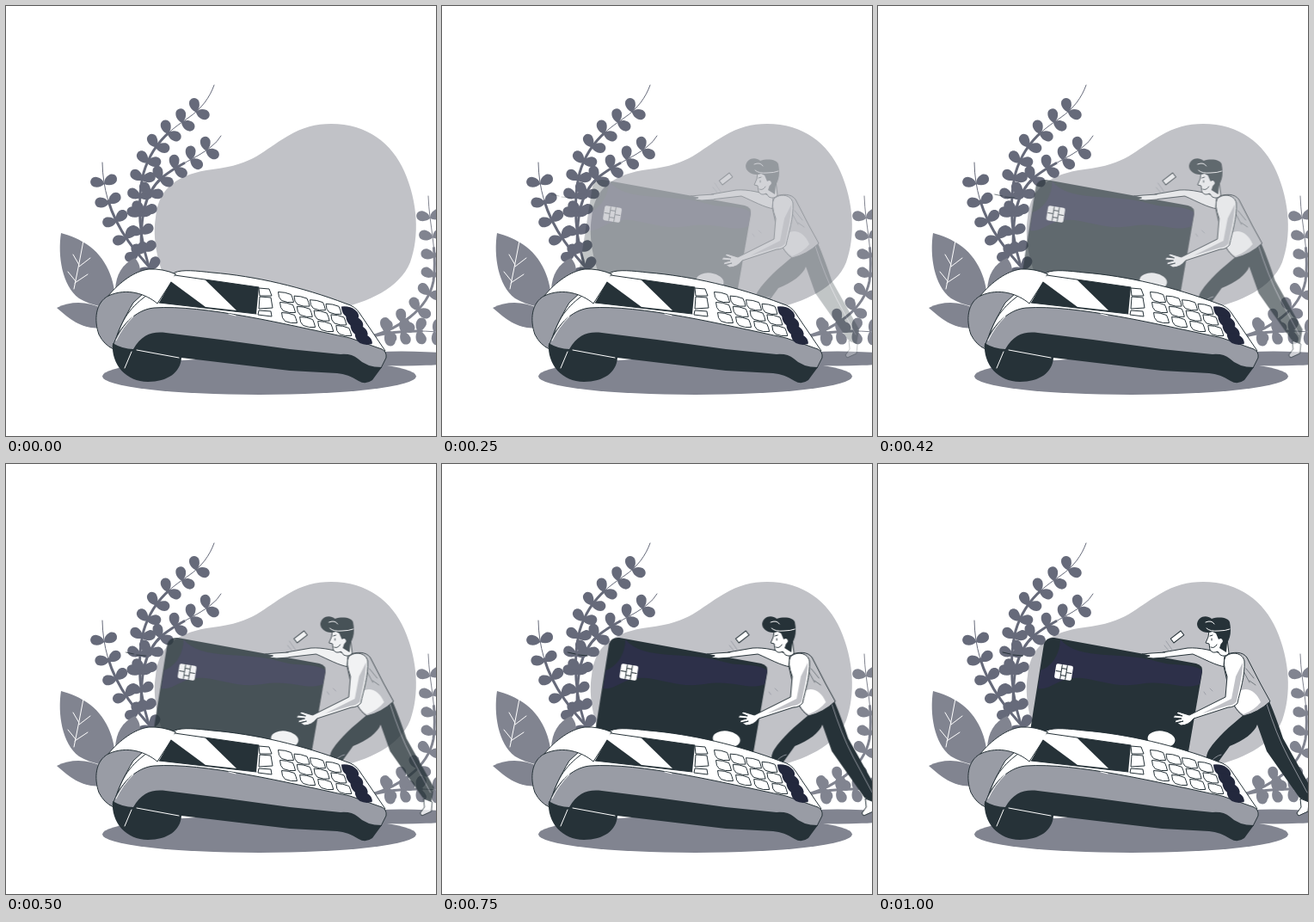
Recreate the animation shown at these times as an HTML page. Size 500 px wide and 500 px high, loop 1040 ms.

```html
<!DOCTYPE html>
<html lang="en">
<head>
<meta charset="utf-8">
<title>Card payment</title>
<style>
html, body { margin: 0; width: 100%; height: 100%; overflow: hidden; background: #fff; }
svg { display: block; width: 100vw; height: 100vh; }
.dark { fill: #263238; }
.navy { fill: #2d3049; }
.grey { fill: #999ca5; }
.mid { fill: #818490; }
.pale { fill: #c1c2c7; }
.white { fill: #fff; }
.ink { stroke: #263238; stroke-width: 1; stroke-linejoin: round; }
.line { fill: none; stroke: #263238; stroke-width: 1; stroke-linecap: round; }
.light { fill: none; stroke: #fff; stroke-width: 1; stroke-linecap: round; }
.soft { fill: none; stroke: #999ca5; stroke-width: .9; stroke-linecap: round; }
</style>
</head>
<body>
<svg viewBox="0 0 500 500">
  <path class="pale" d="M378 137C420 137 449 160 463 192C479 228 481 268 470 298C458 328 420 345 385 352L190 330C176 300 170 270 174 246C177 210 202 195 240 190C290 184 298 168 328 151C345 141 360 137 378 137Z"/>
  <ellipse class="mid" cx="294.500" cy="430.500" rx="182.500" ry="21.500"/>
  <ellipse class="mid" cx="460" cy="410" rx="74" ry="8.500"/>

  <g id="plants"></g>

  <path class="mid" d="M64 264C60 290 65 325 85 340C100 349 116 350 126 352C130 325 118 295 98 280C86 271 75 267 64 264Z"/>
  <path class="mid" d="M59 351C75 343 95 343 112 352V374C90 377 75 365 59 351Z"/>
  <path class="mid" d="M150 293C135 300 128 312 127 330L153 318C158 308 156 300 150 293Z"/>
  <path class="light" d="M90 273Q85 300 79 329M78 289L85 301M98 293L85 303M72 309L81 320M95 312L80 322"/>

  <g id="mover">
    <path class="line" d="M145 219L154 221M157 222L168 223"/>

    <!-- far arm -->
    <path class="white ink" d="M404 222C390 217 374 213 360 214L331 219V225L366 221C380 227 392 234 404 236Z"/>

    <!-- card -->
    <path class="dark" d="M205 202L370 232Q378 234 377 242L360 340L177 310L193 209Q196 201 205 202Z"/>
    <path class="navy" d="M212 204C232 229 286 218 322 229C348 237 362 230 377 240L374 256C355 264 336 250 304 256C268 262 242 242 216 251C203 256 196 263 186 261L189 240C200 236 211 225 212 204Z"/>
    <g transform="translate(216 242) rotate(9)">
      <rect class="white" x="-10" y="-8.500" width="20" height="17" rx="2"/>
      <path class="line" stroke-width=".8" d="M-3 -8V-4H3V-8M-3 8V4H3V8M-9 0H-3M9 0H3M-3 -4V4M3 -4V4"/>
    </g>
    <ellipse class="white" cx="329.500" cy="320" rx="16" ry="9.500" transform="rotate(7 329.500 320)"/>
    <path class="white ink" d="M334 219L318 220L307 221L316 223L311 225L320 226L334 225"/>

    <!-- accents -->
    <rect class="white ink" x="-7.500" y="-3" width="15" height="6" transform="translate(348 201) rotate(-38)"/>
    <path class="soft" d="M335 206L342 216M333 211L338 217M379 265L381 268M386 261L389 264"/>

    <!-- legs -->
    <path class="dark" d="M426 291L455 276C461 290 466 304 471 319L503 376L500 393L490 388L452 334L441 303C438 312 425 322 409 328L396 346V360L386 358C381 349 380 340 385 332C395 317 408 306 426 291Z"/>
    <path class="soft" d="M452 279C459 301 467 322 477 341L499 382M386 348Q391 340 399 338"/>
    <path class="white ink" d="M491 389L501 393L500 404L489 409L487 406L492 399Z"/>

    <!-- torso -->
    <path class="pale ink" d="M403 222C414 218 424 218 429 225L445 256L456 276Q442 289 425 293C416 287 410 276 408 262L402 235Z"/>
    <path class="white" d="M419 265C428 258 440 264 445 277Q438 286 425 291C418 287 414 280 414 275Z"/>
    <path class="line" d="M425 241L432 254M428 238L437 249M432 252L439 257" opacity=".5"/>

    <!-- head -->
    <path class="white ink" d="M385 194L384 201L381 208L385 209L386 216Q389 221 395 218L398 222Q404 225 408 220L405 195Z"/>
    <path class="dark" d="M389 195C380 198 371 193 371 186C372 177 382 175 388 180C397 177 408 179 409 184C411 194 410 202 406 208L405 219L397 214L399 208L396 204L393 197Z"/>
    <path class="white" d="M396 204Q400 201 401 206Q399 211 396 208Z"/>
    <path class="light" d="M382 191Q386 195 396 194Q404 194 409 192M381 184Q388 181 391 186"/>
    <path class="line" d="M386 200L389 199M388 203V205M387 213Q391 215 394 210"/>

    <!-- near arm -->
    <path class="white ink" d="M404 224C412 217 424 220 426 229C427 246 421 264 418 278Q414 283 407 283L367 296Q361 304 352 304L348 301L355 299L345 301L346 298L353 296L343 295L345 292L354 293L347 290L349 288L362 292L404 271L406 247Q400 231 404 224Z"/>
    <path class="pale" d="M424 231C424 247 419 263 417 276Q413 281 407 281L377 290L411 273L416 247Z"/>
  </g>

  <!-- terminal -->
  <path class="white ink" d="M127 396C130 373 140 355 159 340L196 310C205 306 222 308 240 310C290 314 345 327 395 346Q406 349 411 357L441 401L420 405L160 395Z"/>
  <path class="grey ink" d="M119 337C104 345 102 365 108 382Q114 394 125 399C127 382 138 362 148 345L160 334L150 318Z"/>
  <path class="white ink" d="M119 337C132 321 150 308 166 306Q182 305 198 312L176 346C163 335 141 327 119 337Z"/>
  <path class="grey ink" d="M124 396C131 374 150 353 172 351C230 347 325 370 400 386L437 399Q443 402 442 409L436 421L400 420L150 405Z"/>
  <path class="dark" d="M124 392Q136 399 148 399C158 382 170 378 186 380L250 388L330 399L389 405Q402 404 409 410Q419 420 437 420L426 435Q418 441 410 436Q398 428 385 427L330 424L204 409C203 426 188 437 165 437C140 437 122 417 124 392Z"/>
  <path class="light" d="M146 402L138 421M152 400L201 409"/>
  <path class="light" d="M128 389Q135 374 148 361M259 358L267 360" stroke-width="2"/>
  <path class="dark" d="M196 313L294 327L291 358L178 345Z"/>
  <path class="white" d="M190 319L198 312L228 315L268 354L232 350Z"/>
  <path class="line" d="M196 313L294 327M178 345L291 358"/>
  <g id="keys">
    <path class="white ink" d="M294 328L306 329L309 337H295ZM295 338L308 339L310 351L294 352ZM294 354L308 355L309 361L293 359Z"/>
  </g>
</svg>
<script>
const NS = 'http://www.w3.org/2000/svg';
const byId = id => document.getElementById(id);

function addPath(parent, d, attrs) {
  const p = document.createElementNS(NS, 'path');
  p.setAttribute('d', d);
  for (const k in attrs) p.setAttribute(k, attrs[k]);
  parent.append(p);
  return p;
}

const LEAF = 'M0 0C2 -5 8 -9 13 -7C18 -4 17 2 12 4C7 5 3 4 0 0Z';

// A tapering stem with pairs of leaves at even steps between two fractions of its length.
function sprig(d, color, from, to, pairs, spread = 50) {
  const g = byId('plants');
  const base = { fill: 'none', stroke: color, 'stroke-linecap': 'round' };
  const stem = addPath(g, d, { ...base, 'stroke-width': 1 });
  const len = stem.getTotalLength();
  addPath(g, d, { ...base, 'stroke-width': 3, 'stroke-linecap': 'butt', 'stroke-dasharray': `${len * .7} ${len}` });
  for (let i = 0; i < pairs; i++) {
    const s = len * (from + (to - from) * i / (pairs - 1));
    const a = stem.getPointAtLength(s), b = stem.getPointAtLength(s + 1);
    const dir = Math.atan2(b.y - a.y, b.x - a.x) * 180 / Math.PI;
    for (const side of [-1, 1]) {
      addPath(g, LEAF, {
        fill: color,
        transform: `translate(${a.x} ${a.y}) rotate(${dir + side * spread}) scale(1 ${-side})`
      });
    }
  }
}

const SLATE = '#666a7a', MIST = '#818490';
sprig('M170 312C154 275 152 225 160 194C170 160 190 145 212 130C228 119 237 106 242 92', SLATE, .11, .85, 10);
sprig('M157 285C157 250 158 220 182 199C200 184 222 177 238 164Q246 158 250 151', SLATE, .26, .86, 6);
sprig('M174 312C147 282 113 245 112 182', SLATE, .05, .83, 6, 58);
sprig('M426 384C455 375 490 355 497 320C502 285 492 255 491 221', MIST, .08, .87, 8, 58);
sprig('M426 384C450 378 480 376 510 380', MIST, .18, .85, 4, 55);

const keys = byId('keys');
for (let c = 0; c < 4; c++) {
  for (let r = 0; r < 3; r++) {
    const x = 316.5 + 18.5 * c + r * (2 + 1.3 * c);
    const y = 332.5 + 4.6 * c + r * (12 + .2 * c);
    addPath(keys, `M${x} ${y}q8 0 15 3q2 4 3 9q-7 1 -14 -2q-4 -3 -4 -10Z`, { class: 'white ink' });
  }
}
for (let r = 0; r < 4; r++) {
  const x = 390 + 5.2 * r, y = 349.5 + 10.2 * r;
  addPath(keys, `M${x} ${y}q10 -1 16 4q5 4 4 9q-8 2 -14 -1q-6 -4 -6 -12Z`, { fill: '#23283d' });
}

const slide = byId('mover').animate(
  [{ opacity: 0, transform: 'translateX(-25px)' }, { opacity: 1, transform: 'translateX(0)' }],
  { duration: 1000, easing: 'cubic-bezier(.36, -.01, .5, 1.38)', fill: 'both' }
);
slide.pause();

// The picture advances 25 times per loop and rests hidden on the first step.
const LOOP = 1040, STEP = 1000 / 24;
const start = performance.now();

function draw() {
  const t = Math.max(0, performance.now() - start) % LOOP;
  const step = Math.min(24, Math.floor((t + 5) / STEP));
  slide.currentTime = step && (step + 1) * 40;
  requestAnimationFrame(draw);
}
draw();
</script>
</body>
</html>
```
